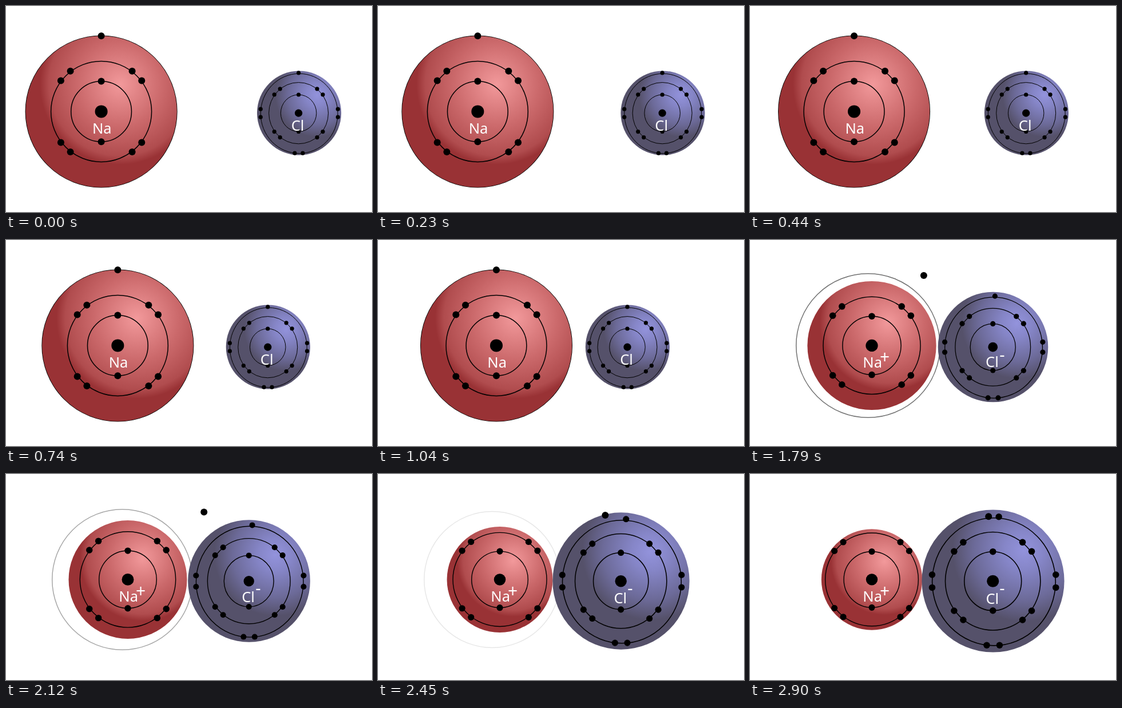
Animation of 640 by 360 pixels, one loop 2.93 s. Source, as an HTML page:

```html
<!DOCTYPE html>
<html lang="en">
<head>
<meta charset="utf-8">
<title>Ionic bond</title>
<style>
  html, body { margin: 0; width: 100%; height: 100%; overflow: hidden; background: #fff; }
  svg { display: block; width: 640px; height: 360px; }
  text { font: 500 25.5px "Noto Sans", "Open Sans", sans-serif; fill: #fff; text-anchor: middle; }
  .plus { font-size: 30px; }
  .minus { font-size: 29px; }
  .orbit { fill: none; stroke: #000; }
</style>
</head>
<body>
<svg viewBox="0 0 640 360">
  <defs>
    <radialGradient id="red" cx=".625" cy=".32" r=".53">
      <stop offset="0" stop-color="#f2999b"/>
      <stop offset=".53" stop-color="#cb696b"/>
      <stop offset=".89" stop-color="#b04c4e"/>
      <stop offset="1" stop-color="#993235"/>
    </radialGradient>
    <radialGradient id="blue" cx=".715" cy=".285" r=".5">
      <stop offset="0" stop-color="#9393dc"/>
      <stop offset=".27" stop-color="#8686c8"/>
      <stop offset=".7" stop-color="#6c6a98"/>
      <stop offset="1" stop-color="#55516a"/>
    </radialGradient>
  </defs>
  <circle id="shell" class="orbit" stroke-width="1.5" cy="184.5"/>
  <circle id="naBall" fill="url(#red)" cy="184.5"/>
  <g id="na" stroke-width="1.5"></g>
  <circle id="clBall" fill="url(#blue)" cy="187"/>
  <g id="cl" stroke-width="1"></g>
  <circle id="mover"/>
  <text id="naText" y="222.6">Na</text>
  <text id="clText">Cl</text>
  <g id="signs">
    <text class="plus" x="235.5" y="214.7">+</text>
    <text class="minus" id="minus" x="441">-</text>
  </g>
</svg>
<script>
const LOOP = 2930, FIRST = 50, STEP = 30;

// [step, progress]
const APPROACH = [[0, 0], [14, .333], [18, .47], [34, .87], [36, 1]];
const TRANSFER = [[36, 0], [46, .2], [59, .445], [72, .69], [81, .903], [86, 1]];

const $ = id => document.getElementById(id);
const mix = (a, b, p) => a + (b - a) * p;

function set(el, attrs) {
  for (const k in attrs) el.setAttribute(k, attrs[k]);
  return el;
}

function add(parent, tag, attrs) {
  return parent.appendChild(set(document.createElementNS("http://www.w3.org/2000/svg", tag), attrs));
}

function along(table, x) {
  if (x <= table[0][0]) return table[0][1];
  for (let k = 1; k < table.length; k++) {
    const [x0, y0] = table[k - 1], [x1, y1] = table[k];
    if (x <= x1) return mix(y0, y1, (x - x0) / (x1 - x0));
  }
  return 1;
}

const dot = (g, cx, cy, r) => add(g, "circle", { cx, cy, r });
const orbit = (g, cx, cy, rx, ry) => add(g, "ellipse", { class: "orbit", cx, cy, rx, ry });

// Nucleus, a pair on the inner orbit and four pairs on the middle one
function core(g, { nucleus, inner, middle, far, near, r, squeeze }) {
  orbit(g, 0, 0, inner * squeeze, inner);
  orbit(g, 0, 0, middle * squeeze, middle);
  dot(g, 0, 0, nucleus);
  for (const sy of [-1, 1]) {
    dot(g, 0, sy * inner, r);
    for (const sx of [-1, 1]) {
      dot(g, sx * far, sy * near, r);
      dot(g, sx * near, sy * far, r);
    }
  }
}

core($("na"), { nucleus: 11, inner: 52.9, middle: 88, far: 70.7, near: 54, r: 6, squeeze: 1 });
core($("cl"), { nucleus: 6.6, inner: 32.2, middle: 53.6, far: 42.4, near: 32.4, r: 3.6, squeeze: .97 });
orbit($("cl"), 1.1, .7, 67.4, 69.7);
for (const s of [-1, 1]) {
  dot($("cl"), 1.2 - 67.6, s * 7, 3.6);
  dot($("cl"), 1.2 + 67.6, s * 7, 3.6);
  dot($("cl"), .3 + s * 7, 70, 3.6);
}
const topDot = dot($("cl"), 0, -70.3, 3.6);

function draw(t) {
  const i = t < FIRST ? 0 : 1 + Math.floor((t - FIRST) / STEP);
  const p = along(APPROACH, i), q = along(TRANSFER, i);
  const na = mix(166.6, 213, p), cl = mix(511.6, 424.7, p);
  const drift = 14.7 * q;

  set($("shell"), { cx: na - drift, r: 132.3 - drift, opacity: 1 - q });
  set($("naBall"), { cx: na, r: mix(132.2, 88.2, q) });
  set($("na"), { transform: `translate(${na} 184.4) scale(${mix(1, .925, q)})` });
  set($("clBall"), { cx: cl + mix(1, .3, p), r: mix(73.6, 124.6, q) });
  set($("cl"), { transform: `translate(${cl} 187.2) scale(${mix(1, 1.6, q)})` });
  set(topDot, { cx: 6.5 * q });
  set($("mover"), { cx: mix(na, 417.2, q), cy: mix(52.2, 74.2, q), r: 6 });

  set($("naText"), { x: na + 1.2 });
  set($("clText"), { x: cl - mix(1.5, .9, q), y: mix(218, 227, q) });
  set($("minus"), { y: mix(211.8, 209.8, q) });
  set($("signs"), { visibility: i >= 36 ? "visible" : "hidden" });
}

const start = performance.now();
function tick() {
  draw((performance.now() - start) % LOOP);
  requestAnimationFrame(tick);
}
tick();
</script>
</body>
</html>
```
